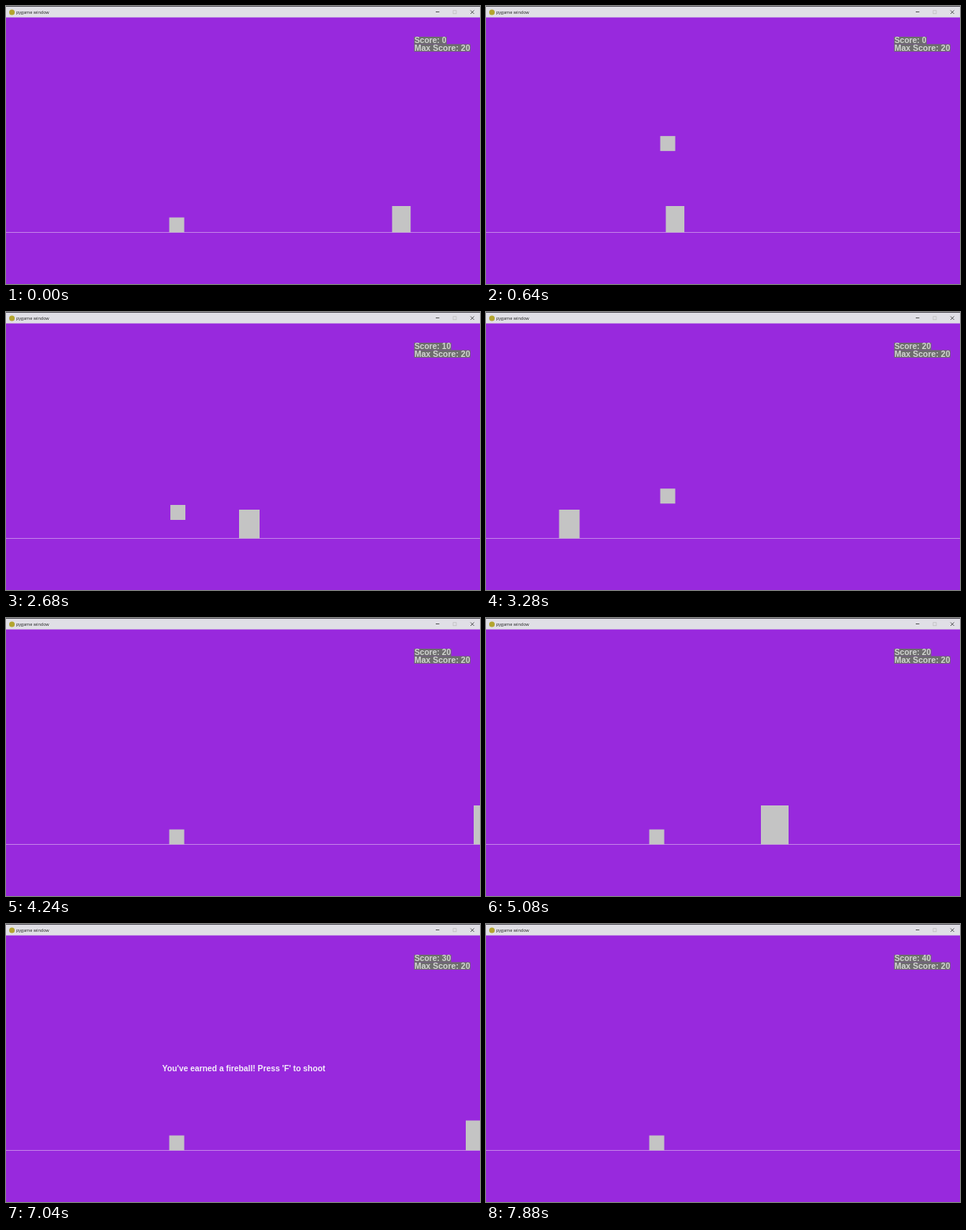
Recreate the animation shown at these times as an HTML page with a canvas. Size 600 by 353 pixels, loop 8000 ms.

```html
<!DOCTYPE html>
<html lang="en">
<head>
<meta charset="utf-8">
<title>Jump game</title>
<style>
  html, body { margin: 0; width: 100%; height: 100%; overflow: hidden; background: #9829dd; }
  canvas { display: block; }
</style>
</head>
<body>
<canvas id="stage" width="600" height="353"></canvas>
<script>
const ctx = document.getElementById('stage').getContext('2d');
const LOOP = 8000, STEP = 40;
const GROUND = 287.5, SIZE = 19, HOME_X = 206.6;
const BLOCK = '#c4c4c4';
const BOLD = '"Liberation Sans", Arial, sans-serif';

// Left edge of each block as [time, x] points, linear in between
const blocks = [
  { w: 23.5, h: 33.5, path: [[0, 488.7], [840, 146], [1280, -25]] },
  { w: 26, h: 36.5, path: [[1760, 599], [2680, 295], [3400, 52], [3640, -27]] },
  { w: 35, h: 49.5, path: [[4240, 592], [5040, 370], [5080, 348], [5880, 144], [5960, 127], [6520, -36]] },
  { w: 27, h: 38, path: [[7000, 595], [7720, 361]] },
];
const scoreTimes = [760, 3040, 5800, 7760];
const jumps = [380, 2640, 5220];
const JUMP_TIME = 720, JUMP_HEIGHT = 112;
const MESSAGE_ON = 5800, SHOT = 7520, HIT = 7760;

function rect(x, y, w, h, color) {
  ctx.fillStyle = color;
  ctx.fillRect(x, y, w, h);
}

function circle(x, y, r, color) {
  ctx.fillStyle = color;
  ctx.beginPath();
  ctx.arc(x, y, r, 0, 2 * Math.PI);
  ctx.fill();
}

function text(str, x, y, font, color, align = 'left') {
  ctx.font = font;
  ctx.fillStyle = color;
  ctx.textAlign = align;
  ctx.fillText(str, x, y);
}

function along(path, t) {
  for (let i = 1; i < path.length; i++) {
    const [t0, x0] = path[i - 1], [t1, x1] = path[i];
    if (t >= t0 && t <= t1) return x0 + (x1 - x0) * (t - t0) / (t1 - t0);
  }
  return null;
}

// Parabolic hop; the sideways drift fades out shortly after landing
function player(t) {
  let dx = 0, height = 0;
  for (const start of jumps) {
    const u = (t - start) / JUMP_TIME;
    if (u <= 0 || u >= 1.25) continue;
    dx = 19 * Math.sin(Math.PI * u / 1.25) ** 1.3;
    height = Math.max(0, 4 * JUMP_HEIGHT * u * (1 - u));
  }
  return { x: HOME_X + dx, y: GROUND - SIZE - height };
}

function label(str, y, size) {
  const font = `bold ${size}px ${BOLD}`;
  ctx.font = font;
  rect(516.6, y, ctx.measureText(str).width + 0.6, 9.5, '#6d6d6d');
  text(str, 516.9, y + 8.2, font, '#d2d4d2');
}

function windowFrame() {
  rect(0, 0, 600, 14.5, '#e0dfe6');
  rect(0, 0, 600, 1, '#55525a');
  circle(7.5, 8, 3.5, '#b3a52f');
  text('pygame window', 13, 10, '5.5px "Open Sans", sans-serif', '#222');
  rect(544, 7, 4.5, 1, '#555');
  ctx.lineWidth = 0.7;
  ctx.strokeStyle = '#bbb';
  ctx.strokeRect(566, 5.8, 4, 4);
  ctx.strokeStyle = '#222';
  ctx.beginPath();
  ctx.moveTo(588, 5.5); ctx.lineTo(592.5, 10);
  ctx.moveTo(592.5, 5.5); ctx.lineTo(588, 10);
  ctx.stroke();
}

function draw(t) {
  rect(0, 0, 600, 353, '#9829dd');
  windowFrame();
  rect(0, 287, 600, 1, '#c27fe9');

  for (const { w, h, path } of blocks) {
    const x = along(path, t);
    if (x !== null) rect(x, GROUND - h, w, h, BLOCK);
  }
  const p = player(t);
  rect(p.x, p.y, SIZE, SIZE, BLOCK);
  if (t >= SHOT && t < HIT) circle(230 + (t - SHOT) * 0.48, 278, 4.5, '#f28a2e');

  if (t >= MESSAGE_ON && t < SHOT) {
    text("You've earned a fireball! Press 'F' to shoot", 301, 187.3,
      `bold 10.3px ${BOLD}`, '#f4effa', 'center');
  }
  label('Score: ' + 10 * scoreTimes.filter(s => t >= s).length, 39, 10.3);
  label('Max Score: 20', 48.4, 10.5);
}

function tick() {
  const t = performance.now() % LOOP;
  draw(Math.floor(t / STEP) * STEP);
  requestAnimationFrame(tick);
}
tick();
</script>
</body>
</html>
```
